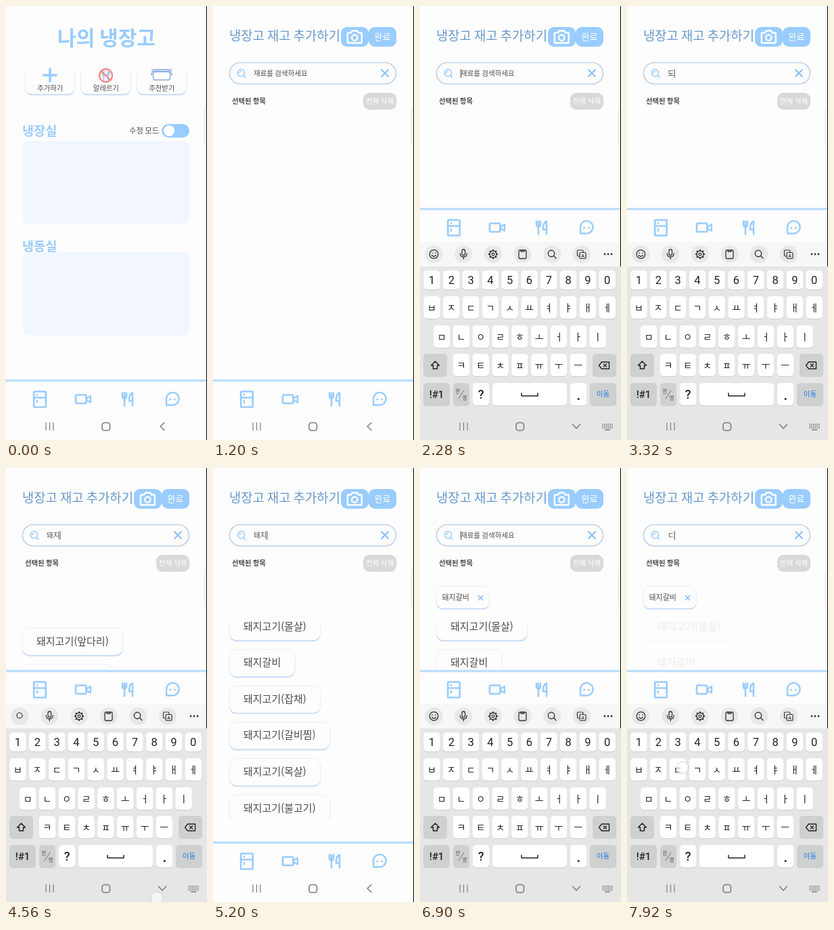
Animation of 297 by 640 pixels, one loop 8 s. Source, as an HTML page with a canvas:

```html
<!DOCTYPE html>
<html lang="ko">
<head>
<meta charset="utf-8">
<style>
html, body { margin: 0; width: 100%; height: 100%; overflow: hidden; background: #fdfdfd; }
canvas { display: block; width: 297px; height: 640px; }
</style>
</head>
<body>
<canvas></canvas>
<script>
const W = 297, H = 640, LOOP = 8000;
const BLUE = '#99ccff', PAGE = '#fdfdfd', INK = '#4c4c4c';
const FONT = '"Noto Sans CJK KR", "Noto Sans CJK JP", "Noto Sans CJK", sans-serif';
const LATIN = 'Roboto, sans-serif';
const canvas = document.querySelector('canvas');
const c = canvas.getContext('2d');
const scale = window.devicePixelRatio || 1;
canvas.width = W * scale;
canvas.height = H * scale;

// Events in ms
const OPEN_ADD = 520, FOCUS = 1800, PICK = 5600, RETYPE = 7840;
const KEYBOARD = [
  { open: 1900, close: 4600 },
  { open: 6400, close: Infinity }
];
const TYPING = [[0, ''], [2750, 'ㄷ'], [3100, '도'], [3450, '돼'], [3800, '돼ㅈ'], [4120, '돼지'], [PICK, ''], [RETYPE, 'ㄷ']];
const LIST_START = 3450, LIST_SCROLL = [4820, 5160, 75.6];
const TAPS = [
  [250, 480, 65, 110], [1640, 1840, 68, 97],
  [2650, 2800, 75, 445], [3000, 3150, 176, 488], [3350, 3500, 248, 445],
  [3700, 3850, 46, 445], [4020, 4170, 263, 488], [4460, 4640, 223, 634],
  [4780, 5080, 150, 400], [5430, 5620, 70, 286], [6200, 6420, 68, 96],
  [7700, 8000, 82, 442]
];
const ITEMS = ['돼지고기(앞다리)', '돼지고기(몰살)', '돼지갈비', '돼지고기(잡채)',
  '돼지고기(갈비찜)', '돼지고기(목살)', '돼지고기(불고기)', '돼지고기(안심)'];

const clamp = v => Math.max(0, Math.min(1, v));
const easeOut = p => 1 - (1 - clamp(p)) ** 3;

function box(x, y, w, h, r, fill, stroke, width = 1) {
  c.beginPath();
  c.roundRect(x, y, w, h, r);
  if (fill) { c.fillStyle = fill; c.fill(); }
  if (stroke) { c.strokeStyle = stroke; c.lineWidth = width; c.stroke(); }
}
function rect(x, y, w, h, fill) {
  c.fillStyle = fill;
  c.fillRect(x, y, w, h);
}
function disc(x, y, r, fill, stroke, width) {
  box(x - r, y - r, 2 * r, 2 * r, r, fill, stroke, width);
}
function text(str, x, y, size, color = INK, align = 'center', weight = 400, family = FONT) {
  c.font = `${weight} ${size}px ${family}`;
  c.fillStyle = color;
  c.textAlign = align;
  c.fillText(str, x, y + size * 0.37);
}
function line(d, x, y, color, width) {
  c.save();
  c.translate(x, y);
  c.strokeStyle = color;
  c.lineWidth = width;
  c.lineCap = c.lineJoin = 'round';
  c.stroke(new Path2D(d));
  c.restore();
}
function clipped(y0, y1, draw) {
  c.save();
  c.beginPath();
  c.rect(0, y0, W, y1 - y0);
  c.clip();
  draw();
  c.restore();
}
// Fades what is already drawn towards the page colour.
function veil(y, h, amount) {
  c.globalAlpha = amount;
  rect(0, y, W, h, PAGE);
  c.globalAlpha = 1;
}
function card(x, y, w, h, r) {
  box(x, y + 1.4, w, h, r, '#b3cdf2');
  box(x, y, w, h, r, PAGE, '#e3ebf7', 0.8);
}

function drawHome() {
  text('나의 냉장고', 148.5, 47, 30, BLUE, 'center', 700);
  clipped(97, 140, () => {
    for (const [x, label] of [[28, '추가하기'], [110.5, '알레르기'], [193, '추천받기']]) {
      card(x, 70, 74, 60, 10);
      text(label, x + 37.3, 121.5, 10.4);
    }
  });
  line('M-9 0H9M0 -9V9', 65, 102, BLUE, 3.6);
  line('M-3 -6V6M3 -6V6M-5 -5V-1H5V-5', 147.5, 102.5, '#a9c9ee', 2);
  disc(147.5, 102.5, 9.5, null, '#f58a86', 2.4);
  line('M-6.5 -6.5L6.5 6.5', 147.5, 102.5, '#f58a86', 2.4);
  box(217.5, 97, 25, 12, 3, '#fff', '#86a9d8', 1.4);
  box(215.5, 93.5, 29, 3, 1, '#b9d6f8', '#86a9d8', 1);
  line('M-12 0H-15V3M12 0H15V3', 230, 99, '#86a9d8', 1.4);

  text('냉장실', 24, 184.5, 18.6, BLUE, 'left', 700);
  text('수정 모드', 182, 183.5, 11.3, INK, 'left');
  box(230, 174, 41, 20, 10, BLUE);
  disc(241, 184, 8, '#fff');
  box(24.5, 199, 247, 123, 10, '#f2f7ff');
  box(24.5, 362, 247, 124, 10, '#f2f7ff');
  text('냉동실', 24, 354.5, 18.6, BLUE, 'left', 700);
}

function drawList(t, bottom) {
  const fade = t < RETYPE ? 1 : 0.1 * clamp((8000 - t) / 80);
  if (t < LIST_START || fade <= 0) return;
  const [from, to, distance] = LIST_SCROLL;
  const scroll = distance * easeOut((t - from) / (to - from));
  clipped(226, bottom, () => {
    ITEMS.forEach((name, i) => {
      const y = 236 + i * 53.6 - scroll;
      c.font = `400 15px ${FONT}`;
      card(24, y, c.measureText(name).width + 42, 40, 11);
      text(name, 45, y + 19, 15, INK, 'left');
    });
    veil(226, bottom - 226, 1 - fade);
  });
}

function drawAdd(t, lifted) {
  text('냉장고 재고 추가하기', 24, 44.5, 18.8, '#6699cc', 'left', 500);
  box(189, 31, 41, 29, 9, BLUE);
  box(230, 31, 41, 29, 9, BLUE);
  line('M-9.5 -6H-5.5L-3.5 -9H3.5L5.5 -6H9.5Q10.5 -6 10.5 -5V8Q10.5 9 9.5 9H-9.5Q-10.5 9 -10.5 8V-5Q-10.5 -6 -9.5 -6Z', 209.3, 45.5, '#fff', 2.5);
  disc(209.3, 46.7, 4.2, null, '#fff', 2.3);
  text('완료', 250.5, 45, 13, '#fff', 'center', 500);

  box(24.5, 83.5, 246, 31.5, 16, PAGE, '#bfd3ee', 1.7);
  disc(41.5, 98.5, 5.2, null, BLUE, 1.5);
  line('M0 0L3 3M-6.5 -4Q-5.5 -6 -3.5 -6', 45, 102.5, BLUE, 1.5);
  line('M-5 -5L5 5M5 -5L-5 5', 254, 99, '#86bcf7', 1.8);
  const query = TYPING.filter(([at]) => t >= at).pop()[1];
  text(query || '재료를 검색하세요', 60, 99, 10.5, INK, 'left');
  if (t >= FOCUS) {
    const caret = 60.5 + (query ? c.measureText(query).width : 0);
    line('M0 -6V6', caret, 99.5, '#444', 1);
  }

  text('선택된 항목', 28, 140, 10.4, INK, 'left', 700);
  box(222, 128, 49, 25, 9, '#d9d9d9');
  text('전체 삭제', 246.5, 140.5, 10.7, '#fff');
  if (t >= PICK) {
    card(24, 174, 78.5, 33, 9);
    text('돼지갈비', 32.5, 190.5, 11, INK, 'left');
    line('M-3.3 -3.3L3.3 3.3M3.3 -3.3L-3.3 3.3', 89.5, 191.5, '#86bcf7', 1.5);
  }
  drawList(t, lifted ? 299 : 517);
}

function drawTabs(y) {
  rect(0, y, W, 50, PAGE);
  rect(0, y - 0.3, W, 3.4, '#bcdffd');
  y += 28.5;
  box(41.2, y - 11, 17.6, 23, 1.5, null, BLUE, 2.7);
  line('M-9 -2H9M-4 -6.5V-6M-4 2.5V5', 50, y, BLUE, 2.5);
  box(103, y - 6, 15.5, 12.5, 2, null, BLUE, 2.7);
  line('M5.5 -1L11 -4.5V5L5.5 2', 114, y, BLUE, 2.3);
  line('M-8 -9V-5Q-8 -1 -5 -1T-2 -5V-9M-5 -9V10M7 10V-9Q2 -7 2 1V3H7', 180, y, BLUE, 2.5);
  line('M-9 9V0A9.3 9.3 0 1 1 0 9Z', 246, y, BLUE, 2.4);
  for (const dx of [-3.3, 3.3]) disc(246 + dx, y + 0.5, 1.5, BLUE);
}

function key(x, y, w, label, fill = '#fff', size = 14, color = '#222', family = FONT) {
  box(x, y + 1, w, 33, 5, '#cecece');
  box(x, y, w, 33, 5, fill);
  text(label, x + w / 2, y + 16.5, size, color, 'center', 500, family);
}
function keyRow(labels, firstCenter, y) {
  [...labels].forEach((label, i) => key(firstCenter - 12.2 + i * 28.8, y, 24.4, label));
}

function drawToolbar(t) {
  const ink = '#333', y = 366;
  for (let i = 0; i < 6; i++) disc(20.5 + i * 43.7, y, 13, '#e8e8e8');
  if (t > 4300 && t < 4640) {
    disc(20, y - 1, 4, null, ink, 1.2);
  } else {
    disc(20.5, y, 6.3, null, ink, 1.3);
    line('M-2.3 -2V-1.6M2.3 -2V-1.6M-3 1.5Q0 5 3 1.5', 20.5, y, ink, 1.3);
  }
  box(62, y - 7, 4.6, 8.5, 2.3, null, ink, 1.3);
  line('M-5 -1Q-5 4 0 4T5 -1M0 4V7', 64.3, y, ink, 1.3);
  for (let i = 0; i < 8; i++) {
    const a = i * Math.PI / 4;
    disc(108 + 5.9 * Math.cos(a), y + 5.9 * Math.sin(a), 1.2, ink);
  }
  disc(108, y, 5, null, ink, 1.3);
  disc(108, y, 1.9, null, ink, 1.2);
  box(146, y - 6, 11, 12.5, 2, null, ink, 1.3);
  line('M-2.5 -6V-4H2.5V-6', 151.5, y, ink, 1.3);
  disc(194, y - 1, 4.7, null, ink, 1.4);
  line('M0 0L3.5 3.5', 197.5, y + 2.5, ink, 1.4);
  box(232.5, y - 6, 8.5, 9, 1.5, null, ink, 1.2);
  box(236, y - 2.5, 9, 9, 1.5, '#e8e8e8', ink, 1.2);
  text('A', 240.5, y + 2, 7, ink, 'center', 500, LATIN);
  for (const x of [273, 278, 283]) disc(x, y, 1.4, ink);
}

function drawKeyboard(t, shown) {
  if (shown <= 0) return;
  c.save();
  c.translate(0, 292 * (1 - shown));
  rect(0, 348, W - 1, 36, '#f7f7f7');
  rect(0, 384, W, 256, '#e6e6e6');
  drawToolbar(t);
  for (let i = 0; i < 10; i++) {
    const x = 5.3 + i * 28.8;
    box(x, 391, 24.4, 28, 5, '#cecece');
    box(x, 390, 24.4, 28, 5, '#fff');
    text(String((i + 1) % 10), x + 12.2, 404, 16.5, '#222', 'center', 400, LATIN);
  }
  keyRow('ㅂㅈㄷㄱㅅㅛㅕㅑㅐㅔ', 17.5, 428);
  keyRow('ㅁㄴㅇㄹㅎㅗㅓㅏㅣ', 32.2, 471);
  keyRow('ㅋㅌㅊㅍㅠㅜㅡ', 61, 513);
  const gray = '#cfd0d0';
  key(5, 513, 35, '', gray);
  line('M0 -6L6 0H3V5H-3V0H-6Z', 22.5, 530, '#222', 1.5);
  key(255, 513, 35, '', gray);
  line('M-8 0L-4 -5H7V5H-4ZM-1 -2L3 2M3 -2L-1 2', 272.5, 530, '#222', 1.4);
  key(5, 556, 39, '!#1', gray, 15, '#222', LATIN);
  key(49, 556, 24, '', gray);
  text('한', 56, 568, 7.5);
  text('영', 66, 578, 7.5);
  line('M4 -6L-4 6', 61, 573, '#555', 0.8);
  key(78, 556, 24.4, '?', '#fff', 18, '#222', LATIN);
  key(107, 556, 110, '');
  line('M-12 -2V2H12V-2', 162, 573, '#222', 1.5);
  key(222, 556, 24.4, '.', '#fff', 22, '#222', LATIN);
  key(251, 556, 39, '이동', gray, 10.5, '#1a7ae0');
  veil(348, 292, 1 - shown);
  c.restore();
}

function drawSystemBar(open) {
  const ink = '#7c7c7c';
  line('M-5.5 -5.5V5.5M0 -5.5V5.5M5.5 -5.5V5.5', 64.5, 620, ink, 1.2);
  box(142, 614.5, 11.5, 11.5, 3.5, null, ink, 1.6);
  if (!open) return line('M3 -5.5L-3 0L3 5.5', 231, 620, ink, 1.5);
  line('M-5.5 -3L0 3L5.5 -3', 231, 620, ink, 1.5);
  for (let row = 0; row < 3; row++)
    for (let col = 0; col < 6; col++) rect(269.5 + col * 2.7, 616 + row * 2.7, 1.6, 1.6, ink);
  rect(273, 624.2, 8, 1.5, ink);
}

function drawTaps(t) {
  for (const [start, end, x, y] of TAPS) {
    const alpha = Math.min(clamp((t - start) / 60), clamp(1 - (t - end) / 140));
    if (alpha <= 0) continue;
    c.globalAlpha = alpha;
    disc(x, y, 9, 'rgba(255,255,255,.6)', '#cfcfe2', 1);
    c.globalAlpha = 1;
  }
}

function draw(t) {
  c.setTransform(scale, 0, 0, scale, 0, 0);
  rect(0, 0, W, H, PAGE);

  const session = KEYBOARD.find(k => t >= k.open - 60 && t < k.close + 200);
  const shown = session
    ? easeOut((t - session.open) / 330) * (1 - clamp((t - session.close) / 200) ** 2)
    : 0;
  const lifted = !!session && t < session.close + 100;

  if (t < OPEN_ADD) drawHome();
  else drawAdd(t, lifted);
  drawTabs(lifted ? 298 : 551);
  box(293, 149, 8, 57, 4, '#f6f6f6', '#e4e4e4', 0.8);
  rect(296, 0, 1, H, '#000');
  drawKeyboard(t, shown);
  drawSystemBar(shown > 0.9);
  drawTaps(t);
}

function frame(now) {
  draw(now % LOOP);
  requestAnimationFrame(frame);
}
requestAnimationFrame(frame);
</script>
</body>
</html>
```
